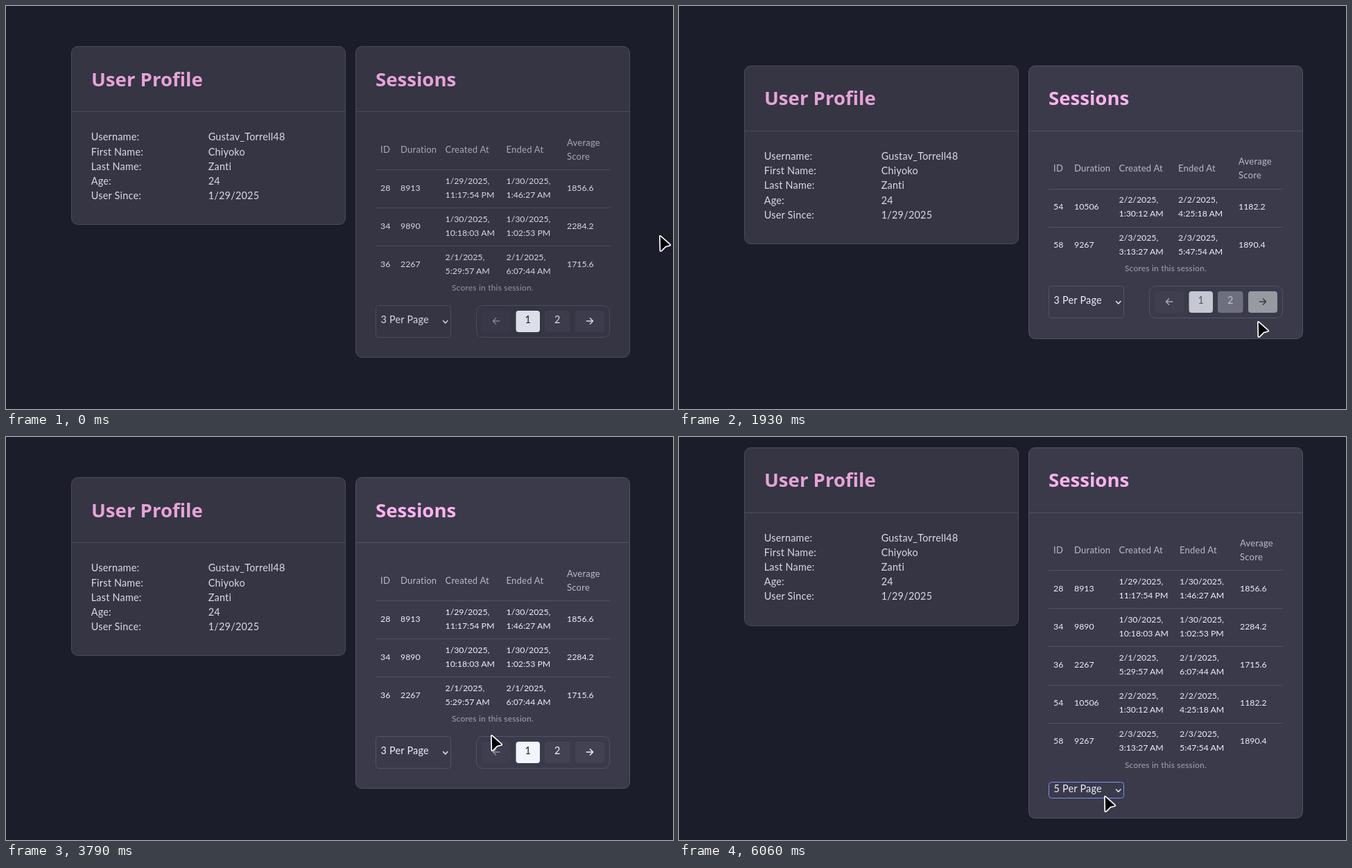
Animation of 962 by 582 pixels, one loop 9.55 s. Source, as an HTML page:

```html
<!DOCTYPE html>
<html lang="en">
<head>
<meta charset="utf-8">
<title>User Profile</title>
<style>
  html, body { margin: 0; width: 100%; height: 100%; overflow: hidden; background: #1c1d2b; }
  svg { display: block; }
  text { font: 14.4px Lato, sans-serif; letter-spacing: .24px; fill: #edf0f9; }
  .title { font: 700 27.6px "Noto Sans", sans-serif; letter-spacing: 0; fill: #fdb3ec; }
  .head { font-size: 13px; fill: #b9bac7; }
  .cell { font-size: 12.3px; letter-spacing: 0; }
  .note { font-size: 11.9px; fill: #a3a4b2; text-anchor: middle; }
  .mid { text-anchor: middle; }
  .line { fill: none; stroke: #525365; }
  .icon { fill: none; stroke-width: 1.4; stroke-linecap: round; stroke-linejoin: round; }
  .cursor { fill: #000; stroke: #fff; stroke-width: 1.7; stroke-linejoin: round; }
</style>
</head>
<body>
<svg id="stage" width="962" height="582" viewBox="0 0 962 582"></svg>
<script>
const LOOP = 9550, STEP = 80, ROW = 55.2;
const BURSTS = [0, 1930, 2580, 3470, 4840, 5980];
const stage = document.getElementById('stage');

const profile = [
  ['Username:', 'Gustav_Torrell48'], ['First Name:', 'Chiyoko'], ['Last Name:', 'Zanti'],
  ['Age:', '24'], ['User Since:', '1/29/2025']
];
const sessions = [
  ['28', '8913', '1/29/2025,|11:17:54 PM', '1/30/2025,|1:46:27 AM', '1856.6'],
  ['34', '9890', '1/30/2025,|10:18:03 AM', '1/30/2025,|1:02:53 PM', '2284.2'],
  ['36', '2267', '2/1/2025,|5:29:57 AM', '2/1/2025,|6:07:44 AM', '1715.6'],
  ['54', '10506', '2/2/2025,|1:30:12 AM', '2/2/2025,|4:25:18 AM', '1182.2'],
  ['58', '9267', '2/3/2025,|3:13:27 AM', '2/3/2025,|5:47:54 AM', '1890.4']
];
const headers = ['ID', 'Duration', 'Created At', 'Ended At', 'Average|Score'];

const makeView = (top, height, from, to, page, cols) => {
  const tableY = top + 177.5;
  return { top, height, rows: sessions.slice(from, to), page, cols, tableY,
           footY: tableY + ROW * (to - from) + 30.3 };
};
const first = makeView(58.4, 449, 0, 3, 1, [540, 569, 633.5, 721.5, 809]);
const second = makeView(86, 394, 3, 5, 2, [540, 570, 634.5, 720, 807]);
const all = makeView(14.5, 535, 0, 5, 0, [540, 570, 634.5, 722, 809]);
const viewAt = t => t < 1930 ? first : t < 3470 ? second : t < 5980 ? first : all;

// Pointer stops: time, x, y
const path = [
  [0, 942, 331], [800, 588, 446], [880, 588, 446], [1600, 834, 455], [2500, 834, 455],
  [2580, 826, 454], [3220, 714, 434], [3710, 714, 434], [3790, 699, 430],
  [4270, 607, 447], [4760, 607, 447], [5400, 613, 518], [LOOP, 613, 518]
];
function pointer(t) {
  const i = Math.max(1, path.findIndex(p => p[0] >= t));
  const [t0, x0, y0] = path[i - 1], [t1, x1, y1] = path[i];
  const k = 1 - (1 - (t - t0) / (t1 - t0)) ** 1.6;
  return [x0 + (x1 - x0) * k, y0 + (y1 - y0) * k];
}

const buttons = [
  { x: 686, w: 42, dir: -1 }, { x: 735.5, w: 34.5, page: 1 },
  { x: 777, w: 36.5, page: 2 }, { x: 821, w: 42, dir: 1 }
];
const idle = [[66, 66, 83], [240, 243, 251]];
const disabled = [[62, 62, 79], [145, 146, 158]];
const active = [[241, 245, 254], [28, 29, 43]];
const hovered = [[181, 184, 187], [28, 29, 43]];

const buttonTop = v => Math.round(v.footY + 8);
const isDisabled = (b, v) => b.dir && v.page === (b.dir < 0 ? 1 : 2);
function isOver(b, t) {
  const v = viewAt(t), [x, y] = pointer(t), top = buttonTop(v);
  return v.page && !isDisabled(b, v) && x >= b.x && x <= b.x + b.w && y >= top && y <= top + 31;
}
function look(b, t) {
  const v = viewAt(t);
  if (isDisabled(b, v)) return disabled;
  if (b.page && b.page === v.page) return active;
  return isOver(b, t) ? hovered : idle;
}

// Averaging the recent past gives a linear transition
const recent = (t, span) => [0, 1, 2, 3].map(i => Math.max(0, t - i * span / 3));
const mean = list => list.reduce((a, b) => a + b) / list.length;
const blend = colors => `rgb(${[0, 1, 2].map(i => mean(colors.map(c => c[i])))})`;

const snap = y => Math.round(y) + .5;
const text = (x, y, s, cls = '', style = '') =>
  `<text x="${x}" y="${y}" class="${cls}" style="${style}">${s}</text>`;
const rect = (x, y, w, h, r, attrs) =>
  `<rect x="${x}" y="${y}" width="${w}" height="${h}" rx="${r}" ${attrs}/>`;
const hline = (x, y, w) => `<path class="line" d="M${x} ${snap(y)}h${w}"/>`;
const lines = (x, y, s, cls) => {
  const parts = s.split('|');
  return parts.map((p, i) => text(x, y + (i - (parts.length - 1) / 2) * 20, p, cls)).join('');
};

function card(x, top, height, title, light, body) {
  return `<g style="filter:brightness(${light})">` +
    rect(x + .5, snap(top), 395, height, 9, 'fill="#3a3a4b" stroke="#525365"') +
    hline(x + 1, top + 94, 394) + text(x + 29, top + 57.4, title, 'title') + body + '</g>';
}

function button(b, v, t) {
  const y = buttonTop(v);
  const looks = recent(t, 120).map(s => look(b, s));
  const bg = blend(looks.map(l => l[0])), fg = blend(looks.map(l => l[1]));
  const cx = b.x + b.w / 2;
  const label = b.page
    ? text(cx, y + 18, b.page, 'mid', `fill:${fg}`)
    : `<path class="icon" stroke="${fg}" transform="translate(${cx} ${y + 15}) scale(${b.dir} 1)" d="M-4.6 0h9.2M.4-4.2L4.6 0 .4 4.2"/>`;
  return rect(b.x, y, b.w, 31, 4, `fill="${bg}"`) + label;
}

function table(v) {
  const head = headers.map((h, i) => lines(v.cols[i], v.tableY - 24.3, h, 'head')).join('');
  const rows = v.rows.map((row, r) => {
    const y = v.tableY + r * ROW;
    return hline(533, y, 338) + row.map((s, i) => lines(v.cols[i], y + 30.6, s, 'cell')).join('');
  }).join('');
  return head + rows + text(702, v.footY - 20.8, 'Scores in this session.', 'note');
}

function footer(v, t) {
  const y = snap(v.footY), h = v.page ? 46 : 23;
  const border = t >= 4430 ? '#7c8ff0' : '#525365';
  const select = rect(533.5, y, 108, h, 4, `fill="none" stroke="${border}"`) +
    text(540.5, y + h / 2 + 2.8, `${v.page ? 3 : 5} Per Page`) +
    `<path class="icon" stroke="#edf0f9" d="M630.5 ${y + h / 2 - 1}l3.2 3.4 3.2-3.4"/>`;
  if (!v.page) return select;
  return select + rect(678.5, y, 192, 46, 9, 'class="line"') +
    buttons.map(b => button(b, v, t)).join('');
}

function cursor(t) {
  const [x, y] = pointer(t);
  const shape = buttons.some(b => isOver(b, t))
    ? 'M-3.5 3Q-3.5 .8-1.2 .8 1 .8 1 3V7.5L8 8.5Q11.5 9 11.5 12.5V16Q11 18 10 21.5H0Q-2 18-6 14.5-7 12.5-5 11.8L-3.5 12.5Z'
    : 'M.8 1.6Q1 .4 2.2 1.2L16 13.4Q16.8 14.8 15 15.2L9.5 16.6 3.6 22.6Q1.6 24 1.3 22Z';
  return `<path class="cursor" transform="translate(${x} ${y})" d="${shape}"/>`;
}

function draw(t) {
  const v = viewAt(t);
  const inside = recent(t, 240).map(s => pointer(s)[0] < 900 ? 1 : 0);
  const info = profile.map(([label, value], i) => {
    const y = v.top + 136 + i * 21.2;
    return text(122.7, y, label) + text(291.7, y, value);
  }).join('');
  stage.innerHTML =
    card(94, v.top, 257, 'User Profile', .91, info) +
    card(504, v.top, v.height, 'Sessions', .91 + .09 * mean(inside), table(v) + footer(v, t)) +
    cursor(t);
}

let shown = -1;
const origin = performance.now();
function tick() {
  const t = (performance.now() - origin) % LOOP;
  const start = BURSTS.filter(b => b <= t).pop();
  const now = start + Math.floor((t - start) / STEP) * STEP;
  if (now !== shown) draw(shown = now);
  requestAnimationFrame(tick);
}
tick();
</script>
</body>
</html>
```
